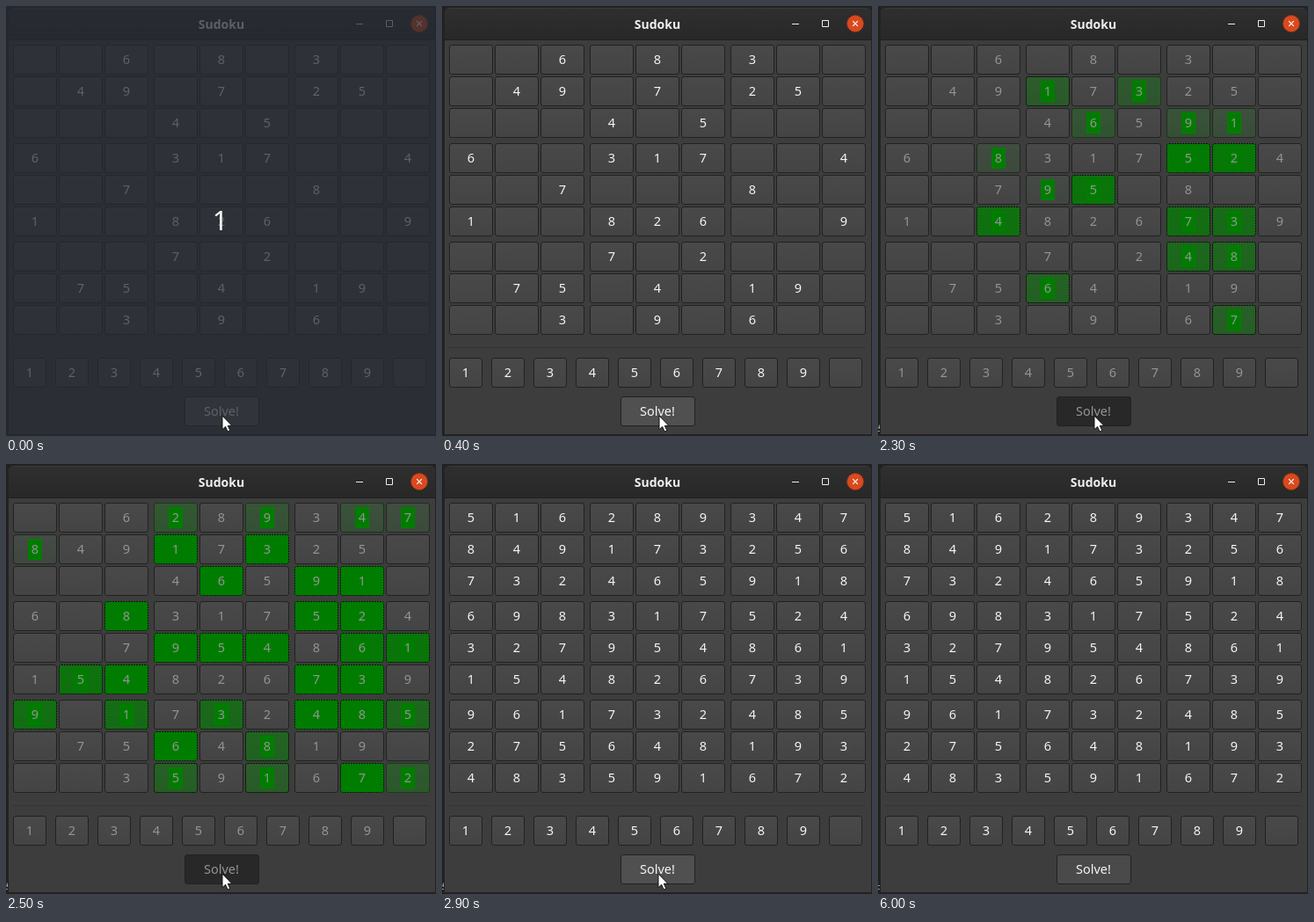
Animation, 489 px wide and 489 px high, one loop 6100 ms. Source, as an HTML page:

```html
<!DOCTYPE html>
<html lang="en">
<head>
<meta charset="utf-8">
<title>Sudoku</title>
<style>
  html, body { margin: 0; width: 100%; height: 100%; overflow: hidden; background: #222; }
  svg { display: block; width: 100vw; height: 100vh; }
  text { font: 14.5px "Noto Sans", "Open Sans", sans-serif; text-anchor: middle; }
  .title { font-size: 14px; font-weight: 700; fill: #f0f0f0; }
  .count { font-size: 31px; font-weight: 500; fill: #f4f4f4; }
</style>
</head>
<body>
<svg id="stage" viewBox="0 0 489 489">
  <defs>
    <linearGradient id="bar" x2="0" y2="1">
      <stop stop-color="#2f2f2f"/><stop offset="1" stop-color="#282828"/>
    </linearGradient>
    <linearGradient id="face" x2="0" y2="1">
      <stop stop-color="#494949"/><stop offset="1" stop-color="#444"/>
    </linearGradient>
  </defs>
  <rect width="489" height="489" fill="#222"/>
  <path d="M3 487V9Q3 2 10 2H482Q488 2 488 9V487Z" fill="#3d3d3d"/>
  <path d="M3 38V9Q3 2 10 2H482Q488 2 488 9V38Z" fill="url(#bar)"/>
  <path d="M3 38.5H488" stroke="#1f1f1f"/>
  <path d="M9 2.5H482" stroke="#3a3a3a"/>
  <text class="title" x="245" y="25.5">Sudoku</text>
  <path d="M398 20.5H406M432.5 16.5H439.5V23.5H432.5Z" fill="none" stroke="#eee"/>
  <circle cx="470" cy="20" r="9.5" fill="#d94a1e" stroke="#8f3418" stroke-width=".7"/>
  <path d="M467.2 17.2L472.8 22.8M472.8 17.2L467.2 22.8" stroke="#fff" stroke-width="1.2"/>
  <path d="M8 388.5H482" stroke="#333"/>
  <g id="buttons"></g>
  <g id="edge" stroke="#b5b5b5" stroke-width=".8">
    <path d="M0 479.5H2M0 483.5H2"/><path id="edgeTip" d="M1.5 476.5V481"/>
  </g>
  <g id="overlay">
    <rect width="489" height="489" fill="#262b33" opacity=".73"/>
    <text class="count" x="243.5" y="255">1</text>
  </g>
  <path id="cursor" d="M.5 .5V16.2L4 12.8L6.6 18.4L9.3 17.2L6.8 11.8H11.3Z"
        fill="#fff" stroke="#111" stroke-width="1"/>
</svg>
<script>
const LOOP = 6100, STEP = 100;
const PRESS = 2110, CLEAR = 2610, FADE = 200;
const GREEN = "#007d00";
const PUZZLE = [
  "..6.8.3..", ".49.7.25.", "...4.5...",
  "6..317..4", "..7...8..", "1..826..9",
  "...7.2...", ".75.4.19.", "..3.9.6.."
].join("");

const $ = id => document.getElementById(id);
const clamp = v => Math.max(0, Math.min(1, v));
const easeOut = v => 1 - (1 - clamp(v)) ** 2;
const mix = (a, b, k) => Math.round(a + (b - a) * k);
const gray = v => `rgb(${v},${v},${v})`;

function add(tag, attrs, parent = $("buttons")) {
  const node = document.createElementNS("http://www.w3.org/2000/svg", tag);
  for (const key in attrs) node.setAttribute(key, attrs[key]);
  return parent.appendChild(node);
}

function show(node, visible) {
  node.setAttribute("visibility", visible ? "visible" : "hidden");
}

function box(x, y, w, fill, border = "#212121") {
  return add("rect", { x: x + .5, y: y + .5, width: w - 1, height: 33, rx: 2.5, fill, stroke: border });
}

function label(x, y, value) {
  const node = add("text", { x, y });
  node.textContent = value;
  return node;
}

// Row-by-row passes that fill every cell with a single candidate.
function solve(puzzle) {
  const grid = [...puzzle], order = [];
  const row = i => Math.floor(i / 9), col = i => i % 9;
  const block = i => Math.floor(row(i) / 3) * 3 + Math.floor(col(i) / 3);
  const sees = (a, b) => row(a) === row(b) || col(a) === col(b) || block(a) === block(b);
  let before;
  do {
    before = order.length;
    for (let i = 0; i < 81; i++) {
      if (grid[i] !== ".") continue;
      const fits = [..."123456789"].filter(d => !grid.some((v, j) => v === d && sees(i, j)));
      if (fits.length === 1) {
        grid[i] = fits[0];
        order.push(i);
      }
    }
  } while (order.length > before);
  return { grid, order };
}

const fillTime = n => n < 34 ? PRESS + 11.5 * n : 2500 + 5.8 * (n - 33);

const { grid, order } = solve(PUZZLE);
const cells = grid.map((digit, i) => {
  const r = Math.floor(i / 9), c = i % 9;
  const x = 8 + 52 * c + 4 * Math.floor(c / 3);
  const y = 44 + 36 * r + 4 * Math.floor(r / 3);
  box(x, y, 50, "url(#face)");
  const n = order.indexOf(i);
  const cell = { start: n < 0 ? -1 : fillTime(n) };
  if (n >= 0) {
    cell.tint = box(x, y, 50, GREEN, GREEN);
    cell.dots = box(x, y, 50, "none", "#111");
    cell.dots.setAttribute("stroke-dasharray", "2 1");
    cell.patch = add("rect", { x: x + 17, y: y + 5, width: 16, height: 24, fill: GREEN });
  }
  cell.text = label(x + 25, y + 22, digit);
  return cell;
});

const keyLabels = [..."123456789", ""].map((digit, i) => {
  box(8 + 48 * i, 400, 38, "url(#face)");
  return label(27 + 48 * i, 422, digit);
});

const solveFace = box(203, 444, 85, "#505050");
keyLabels.push(label(245, 466, "Solve!"));

function drawCell(cell, t, ink) {
  cell.text.setAttribute("fill", ink);
  if (cell.start < 0) return;
  const filled = t >= cell.start;
  const rise = clamp((Math.min(t, CLEAR) - cell.start) / FADE);
  const tint = rise * (1 - easeOut((t - CLEAR) / FADE));
  show(cell.text, filled);
  show(cell.patch, filled && t < CLEAR);
  show(cell.dots, tint > .35 && t < CLEAR);
  cell.tint.setAttribute("opacity", tint);
}

function drawCursor(t) {
  let x = t >= 400 && t < 2100 ? 247 : 246, y = 466;
  if (t >= 4800) {
    const k = clamp((t - 4900) / 400);
    x = mix(236, 103, k);
    y = mix(424, 31, k);
  }
  $("cursor").setAttribute("transform", `translate(${x - .5} ${y - .5})`);
  show($("cursor"), t < 5500);
}

function draw(time) {
  const t = Math.floor(time % LOOP / STEP) * STEP;
  const dim = t < CLEAR ? easeOut((t - PRESS) / FADE) : 1 - easeOut((t - CLEAR) / FADE);
  const ink = gray(mix(245, 148, dim));
  cells.forEach(cell => drawCell(cell, t, ink));
  keyLabels.forEach(node => node.setAttribute("fill", ink));
  solveFace.setAttribute("fill", gray(mix(t < 4800 ? 80 : 74, 40, dim)));
  show($("overlay"), t < 100);
  show($("edge"), t >= 2200);
  show($("edgeTip"), t >= 2200 && t < 6000);
  drawCursor(t);
}

const origin = performance.now();
function tick() {
  draw(performance.now() - origin);
  requestAnimationFrame(tick);
}
tick();
</script>
</body>
</html>
```
